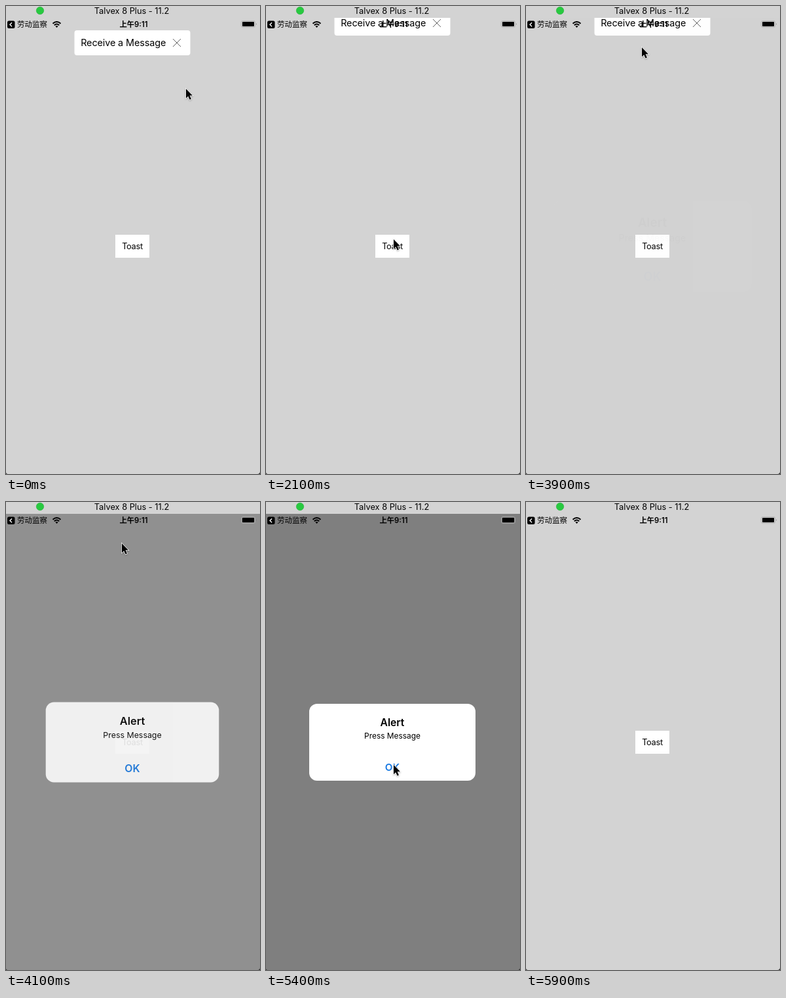
Recreate the animation shown at these times as an HTML page. Size 388 by 712 pixels, loop 6000 ms.

```html
<!DOCTYPE html>
<html lang="en">
<head>
<meta charset="utf-8">
<title>Toast and alert</title>
<style>
  html, body { margin: 0; width: 100%; height: 100%; overflow: hidden; background: #222; }
  svg { display: block; }
  text { font-family: Inter, "Noto Sans CJK SC", "Noto Sans CJK", sans-serif; text-anchor: middle; }
  #cursor { stroke: #fff; stroke-width: 1.4; paint-order: stroke; filter: drop-shadow(0 1px 1px #0004); }
</style>
</head>
<body>
<svg width="388" height="712" viewBox="0 0 388 712">
  <path d="M0 0H388V708Q388 712 384 712H3Q0 712 0 709Z" fill="#d3d3d3"/>

  <rect x="167" y="348" width="52" height="35" fill="#fff"/>
  <text x="193" y="370" font-size="12.8" letter-spacing="-.3">Toast</text>

  <g id="toast">
    <rect x="104.5" y="37" width="177" height="38" rx="4" fill="#fff"/>
    <text x="179.2" y="61.2" font-size="14.4" letter-spacing="-.1">Receive a Message</text>
    <path d="M255 50L267 62M267 50L255 62" stroke="#666"/>
  </g>

  <path id="dim" d="M0 18H388V708Q388 712 384 712H3Q0 712 0 709Z"/>

  <g id="alert">
    <rect x="66" y="307" width="254" height="117" rx="12" fill="#fff"/>
    <text x="193" y="340.5" font-size="15.7" font-weight="600">Alert</text>
    <text x="193" y="359.5" font-size="11.9">Press Message</text>
    <text x="193" y="409" font-size="15.2" font-weight="600" fill="#1678e2">OK</text>
  </g>

  <g id="status">
    <rect x="2" y="22.5" width="11.5" height="11.5" rx="2.5"/>
    <path d="M9 25.2L6 28.2L9 31.2" fill="none" stroke="#fff" stroke-width="1.4"/>
    <text x="40" y="32.2" font-size="11.5">劳动监察</text>
    <path d="M71.5 26.8Q77.5 21.2 83.5 26.8M73.8 29.3Q77.5 25.8 81.2 29.3"
      fill="none" stroke="#000" stroke-width="1.9"/>
    <path d="M75.4 30.8Q77.5 29 79.6 30.8L77.5 33Z"/>
    <text x="195" y="32" font-size="11.3" font-weight="600">上午9:11</text>
    <rect x="359.5" y="22.5" width="21" height="10" rx="2.5" fill="none" stroke="#aaa" stroke-width=".8"/>
    <rect x="361" y="24" width="18" height="7" rx="1"/>
    <path d="M382 26Q383.5 27.5 382 29Z" fill="#777"/>
  </g>

  <rect width="388" height="18" fill="#d3d3d3"/>
  <circle cx="52" cy="7" r="5.7" fill="#28c940" stroke="#24b038" stroke-width=".6"/>
  <text x="192" y="12" font-size="12.8">Talvex 8 Plus - 11.2</text>

  <path id="cursor" d="M0 0V14.2L3.2 11.2L5.6 16.6L7.9 15.6L5.6 10.3H10Z"/>
</svg>

<script>
const LOOP = 6000, STEP = 100, DISMISS = 5430;
const [toast, dim, alertBox, cursor] = ["toast", "dim", "alert", "cursor"]
  .map(id => document.getElementById(id));

const home = { x: 275, y: 126 };
const closeIcon = { x: 261, y: 56 };
const toastButton = { x: 195, y: 355 };
const message = { x: 177, y: 63 };
const okButton = { x: 195, y: 400 };
const exit = { x: 206, y: 412 };

function smooth(t, start, end) {
  const k = Math.min(1, Math.max(0, (t - start) / (end - start)));
  return k * k * (3 - 2 * k);
}

// Eased move to a point, bowed sideways
function glide(t, start, end, from, to, bow = 0) {
  const k = smooth(t, start, end);
  return {
    x: from.x + (to.x - from.x) * k + bow * 4 * k * (1 - k),
    y: from.y + (to.y - from.y) * k
  };
}

function pointerAt(t) {
  if (t < 900) return glide(t, 50, 600, home, closeIcon);
  if (t < 2000) return glide(t, 1050, 1800, closeIcon, toastButton, 15);
  if (t < 3500) return glide(t, 2350, 3150, toastButton, message, 8);
  if (t < 5200) return glide(t, 4420, 4880, message, okButton);
  return glide(t, 5500, 5700, okButton, exit);
}

// What is left of a critically damped spring
function springRest(t, start) {
  const k = Math.max(0, t - start) * 0.014;
  const rest = (1 + k) * Math.exp(-k);
  return rest < 0.015 ? 0 : rest;
}

function draw(t) {
  const hidden = smooth(t, 850, 1150) - smooth(t, 1950, 2250) + smooth(t, 3750, 4050);
  toast.setAttribute("transform", `translate(0 ${-60 * hidden})`);

  const entering = springRest(t, 3890);
  const shown = t < DISMISS ? 1 - entering : springRest(t, DISMISS);
  dim.setAttribute("opacity", 0.4 * shown);
  alertBox.setAttribute("opacity", Math.min(1, 1.1 * shown));
  alertBox.setAttribute("transform",
    `translate(193 365.5) scale(${1 + 0.2 * entering}) translate(-193 -365.5)`);

  const { x, y } = pointerAt(t);
  cursor.setAttribute("transform", `translate(${x} ${y})`);
  cursor.setAttribute("visibility", t < 5700 ? "visible" : "hidden");
}

const begin = performance.now();
function tick() {
  const t = (performance.now() - begin) % LOOP;
  draw(Math.floor(t / STEP) * STEP);
  requestAnimationFrame(tick);
}
tick();
</script>
</body>
</html>
```
